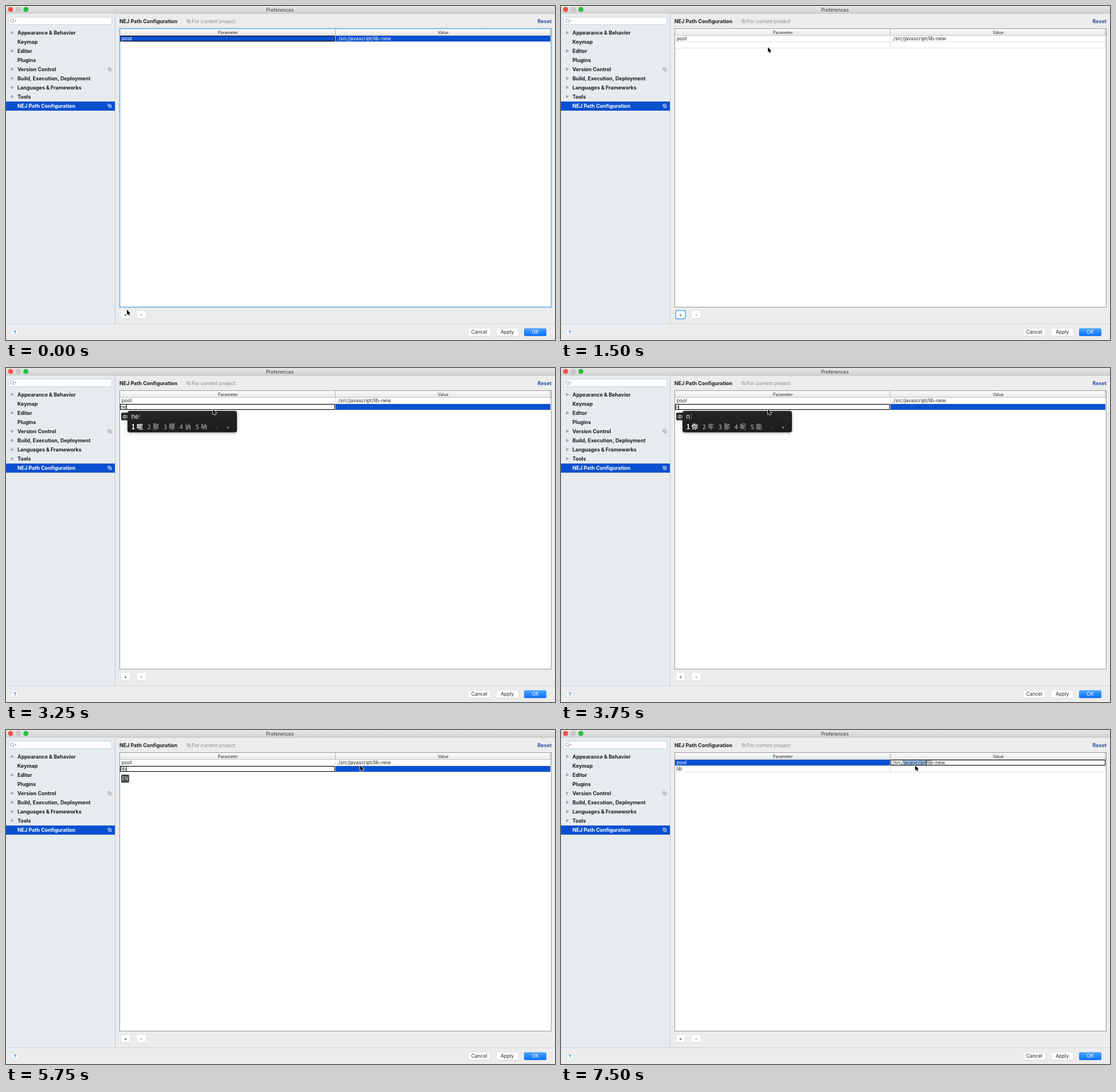
An HTML page with a canvas for the animation above (8000 ms loop, 958 px wide and 584 px high).

```html
<!DOCTYPE html>
<html lang="en">
<head>
<meta charset="utf-8">
<title>Preferences</title>
<style>
html, body { margin: 0; width: 100%; height: 100%; overflow: hidden; background: #ececec; }
canvas { display: block; }
</style>
</head>
<body>
<canvas id="stage" width="958" height="584"></canvas>
<script>
const ctx = document.getElementById('stage').getContext('2d');
const LOOP = 8000, STEP = 250;
const BLUE = '#0950d0', UI = 'Inter, sans-serif', CJK = '"Noto Sans CJK SC", "Noto Sans CJK", sans-serif';
const COLUMNS = [[199, 574], [575, 950]];
const ROW_TOP = [52, 63];
const PATH = './src/javascript/lib-new';

// Each entry changes part of the state and holds until the next one.
const timeline = [
  [0, { cursor: [211, 531], rows: [['pool', PATH]], selected: 0, cell: 0, tableFocus: true }],
  [250, { cursor: [209, 540], rows: [['pool', PATH], ['', '']], selected: -1, tableFocus: false, plusFocus: true }],
  [500, { cursor: [222, 480] }],
  [750, { cursor: [290, 300] }],
  [1000, { cursor: [345, 120] }],
  [1250, { cursor: [358, 79] }],
  [1500, { cursor: [361, 72] }],
  [1750, { selected: 1, tableFocus: true, plusFocus: false }],
  [2000, { tableFocus: false, editing: true }],
  [2500, { caret: true }],
  [3000, { rows: [['pool', PATH], ['n', '']], ime: ['n', '你', '年', '那', '呢', '能'] }],
  [3250, { rows: [['pool', PATH], ['ne', '']], ime: ['ne', '呢', '那', '哪', '讷', '呐'] }],
  [3500, { rows: [['pool', PATH], ['nej', '']], ime: ['ne j', '呢就', '哪家', '那就', '呢', '那'] }],
  [3750, { rows: [['pool', PATH], ['n', '']], ime: ['n', '你', '年', '那', '呢', '能'] }],
  [4000, { rows: [['pool', PATH], ['', '']], ime: null }],
  [4250, { badge: true }],
  [4500, { rows: [['pool', PATH], ['li', '']] }],
  [4750, { rows: [['pool', PATH], ['lib', '']] }],
  [5000, { cursor: [430, 60] }],
  [5250, { cursor: [538, 55] }],
  [5500, { cursor: [602, 56] }],
  [5750, { cursor: [618, 62] }],
  [6000, { cell: 1, editing: false, tableFocus: false, badge: false, caret: false }],
  [6250, { editing: true, caret: true }],
  [6500, { caret: false }],
  [6750, { selected: 0, editing: false }],
  [7000, { editing: true, caret: true, marked: 'javascript' }]
];

function stateAt(time) {
  return Object.assign({}, ...timeline.filter(([start]) => start <= time).map(entry => entry[1]));
}

function rect(x, y, w, h, fill) {
  ctx.fillStyle = fill;
  ctx.fillRect(x, y, w, h);
}

function frame(x, y, w, h, color, width = 1) {
  ctx.strokeStyle = color;
  ctx.lineWidth = width;
  ctx.strokeRect(x, y, w, h);
}

function rounded(x, y, w, h, r, fill, stroke, width = 1) {
  ctx.beginPath();
  ctx.roundRect(x, y, w, h, r);
  ctx.fillStyle = fill;
  ctx.fill();
  if (stroke) {
    ctx.strokeStyle = stroke;
    ctx.lineWidth = width;
    ctx.stroke();
  }
}

function disc(x, y, r, fill, stroke) {
  ctx.beginPath();
  ctx.arc(x, y, r, 0, 7);
  ctx.fillStyle = fill;
  ctx.fill();
  if (stroke) {
    ctx.strokeStyle = stroke;
    ctx.lineWidth = 0.7;
    ctx.stroke();
  }
}

function polygon(points, fill) {
  ctx.beginPath();
  points.forEach(([x, y]) => ctx.lineTo(x, y));
  ctx.closePath();
  ctx.fillStyle = fill;
  ctx.fill();
}

function text(str, x, y, { size = 8.6, weight = 400, color = '#262626', align = 'left', family = UI } = {}) {
  ctx.font = `${weight} ${size}px ${family}`;
  ctx.textAlign = align;
  ctx.fillStyle = color;
  ctx.fillText(str, x, y);
}

function gradient(top, bottom, from, to) {
  const g = ctx.createLinearGradient(0, top, 0, bottom);
  g.addColorStop(0, from);
  g.addColorStop(1, to);
  return g;
}

function copyIcon(x, y, color) {
  frame(x + 2, y + 2, 4, 4, color, 0.8);
  ctx.beginPath();
  ctx.moveTo(x + 0.2, y + 4.5);
  ctx.lineTo(x + 0.2, y + 0.2);
  ctx.lineTo(x + 4.5, y + 0.2);
  ctx.stroke();
  rect(x + 3, y + 3.6, 2, 0.6, color);
}

function drawSidebar() {
  rect(0, 13, 190, 542, '#e6ebef');
  rect(190, 13, 1, 542, '#c8cacc');
  rounded(4.5, 19.5, 180, 13, 1, '#fff', '#d0d5d9');
  disc(10.5, 25.5, 2.9, '#fff', '#6e6e6e');
  ctx.beginPath();
  ctx.moveTo(12.6, 27.7);
  ctx.lineTo(14.8, 30);
  ctx.stroke();
  polygon([[15, 25], [18.4, 25], [16.7, 26.8]], '#6e6e6e');

  const items = ['>Appearance & Behavior', 'Keymap', '>Editor', 'Plugins', '>Version Control',
    '>Build, Execution, Deployment', '>Languages & Frameworks', '>Tools', 'NEJ Path Configuration'];
  items.forEach((item, i) => {
    const y = 46.5 + 16 * i, active = i === 8;
    if (active) rect(0, 167, 190, 16, BLUE);
    if (item[0] === '>') polygon([[9, y - 3], [14, y], [9, y + 3]], '#a2a5a8');
    text(item.replace('>', ''), 20, y + 3.2, { size: 8.9, weight: 700, color: active ? '#fff' : '#1c1c1c' });
    if (active || i === 4) copyIcon(177.8, y - 3, active ? '#fff' : '#8b9aa6');
  });
}

function drawButton(label, x, y, w, h, fill = '#fff', color = '#262626') {
  rounded(x, y + 0.7, w, h, 2.5, '#cdcdcd');
  rounded(x, y, w, h, 2.5, fill, fill === '#fff' ? '#dcdcdc' : null, 0.6);
  text(label, x + w / 2, y + h / 2 + 3.1, { size: 8.5, color, align: 'center' });
}

function drawWindow(s) {
  rect(0, 0, 958, 584, '#ececec');
  rect(0, 0, 958, 13, gradient(0, 13, '#e6e6e6', '#d2d2d2'));
  rect(0, 12.5, 958, 0.8, '#b9b9b9');
  disc(8, 6, 4, '#fc4f4a', '#df4744');
  disc(21.5, 6, 4, '#c9c9c9', '#b8b8b8');
  disc(34.7, 6, 4, '#1fc53a', '#1faa30');
  text('Preferences', 478, 9.6, { size: 8.5, color: '#3d3d3d', align: 'center' });
  drawSidebar();

  text('NEJ Path Configuration', 198, 29.8, { size: 8.9, weight: 700, color: '#1c1c1c' });
  copyIcon(315.5, 23.5, '#9b9b9b');
  text('For current project', 324, 29.8, { size: 8.7, color: '#8a8a8a' });
  text('Reset', 952, 29.8, { size: 8.9, weight: 700, color: '#364f9f', align: 'right' });

  drawButton('+', 200.5, 532.5, 16, 14);
  drawButton('-', 228, 532.5, 16, 14);
  if (s.plusFocus) {
    rounded(200, 532.5, 17, 14.5, 2.5, 'transparent', '#7fb5ef', 2);
  }

  rect(0, 555, 958, 1, '#d2d2d2');
  disc(15.5, 570.5, 6.3, '#fff', '#cfcfcf');
  text('?', 15.5, 574, { size: 9.5, weight: 600, color: '#1677e6', align: 'center' });
  drawButton('Cancel', 806.5, 563.5, 38.5, 13.5);
  drawButton('Apply', 855.5, 563.5, 38.5, 13.5);
  drawButton('OK', 904, 563.5, 39, 13.5, gradient(563, 577, '#4ea7fb', '#0a70ff'), '#fff');
}

function drawEditor(s, value, left, right, top) {
  rect(left, top, right - left, 10, '#fff');
  const x = left + 1.2, base = top + 8.4;
  ctx.font = `400 8.6px ${UI}`;
  let end = x + ctx.measureText(value).width;
  if (s.marked) {
    const before = value.slice(0, value.indexOf(s.marked));
    const start = x + ctx.measureText(before).width;
    end = x + ctx.measureText(before + s.marked).width;
    rect(start, top + 1, end - start, 8.5, '#a6cdfb');
  }
  text(value, x, base);
  if (s.ime) rect(x, top + 9, end - x, 0.7, '#333');
  if (s.caret) rect(Math.round(end), top + 1, 0.9, 8.5, '#000');
  frame(left + 0.5, top + 0.5, right - left - 1, 9, '#000');
}

function drawTable(s) {
  rect(198, 39, 754, 488, '#fff');
  rect(199, 40, 752, 12, gradient(40, 52, '#fcfcfc', '#e6e6e6'));
  rect(199, 51, 752, 1, '#c6c6c6');
  rect(574, 40, 1, 12, '#b4b4b4');
  rect(949.5, 40, 1, 12, '#b4b4b4');
  text('Parameter', 387.3, 49, { size: 7.15, align: 'center' });
  text('Value', 762.8, 49, { size: 7.1, align: 'center' });

  s.rows.forEach((row, r) => {
    const top = ROW_TOP[r], selected = r === s.selected;
    rect(199, top + 10, 751, 0.8, '#d9d9d9');
    rect(574, top, 0.8, 10.5, '#d9d9d9');
    rect(949.3, top, 0.8, 10.5, '#d9d9d9');
    row.forEach((value, c) => {
      const [left, right] = COLUMNS[c], active = selected && c === s.cell;
      if (active && s.editing) return drawEditor(s, value, left, right, top);
      if (selected) rect(left, top, right - left, 10, BLUE);
      if (active) frame(left + 0.5, top + 0.5, right - left - 1, 9, '#000');
      text(value, left + 2.8, top + 8, { color: selected ? '#fff' : '#262626' });
    });
  });

  if (s.tableFocus) frame(198.5, 39.5, 753, 487, '#67aee8', 1.6);
  else frame(198.5, 39.5, 753, 487, '#989898');
}

function drawInputMethod([typed, ...choices]) {
  const wide = choices[0].length > 1, width = wide ? 244 : 191;
  rounded(201, 78, 14, 13.5, 2, '#2b2b2b');
  text('中', 207.7, 88.5, { size: 9.5, color: '#fff', align: 'center', family: CJK });
  ctx.shadowColor = 'rgba(0,0,0,.35)';
  ctx.shadowBlur = 5;
  ctx.shadowOffsetY = 1;
  rounded(212, 75, width, 37.5, 4, gradient(75, 113, '#252525', '#1c1c1c'));
  ctx.shadowColor = 'transparent';
  text(typed, 218.6, 89, { size: 11, color: '#f4f4f4' });
  rect(219 + ctx.measureText(typed).width + 1.2, 80, 0.8, 10, '#777');
  let x = 218.8;
  choices.forEach((choice, i) => {
    const style = { size: 11, weight: i ? 400 : 700, color: i ? '#bdbdbd' : '#fff', family: CJK };
    text(i + 1, x, 107.3, style);
    text(choice, x + 9.2, 107.3, style);
    x += 17 + 11 * choice.length;
  });
  const right = 212 + width;
  polygon([[right - 34, 101.5], [right - 34, 106.5], [right - 37, 104]], '#444');
  polygon([[right - 17, 101.5], [right - 17, 106.5], [right - 13.5, 104]], '#8a8a8a');
}

function drawCursor([x, y]) {
  const arrow = new Path2D('M0 0V8.8L2 7L3.4 10.2L5 9.5L3.7 6.4H6.3Z');
  ctx.save();
  ctx.translate(x, y);
  ctx.strokeStyle = '#fff';
  ctx.lineWidth = 1.3;
  ctx.stroke(arrow);
  ctx.fillStyle = '#000';
  ctx.fill(arrow);
  ctx.restore();
}

function draw(time) {
  const s = stateAt(time);
  drawWindow(s);
  drawTable(s);
  if (s.ime) drawInputMethod(s.ime);
  if (s.badge) {
    rounded(201, 78, 14, 14, 2, '#444');
    text('EN', 208, 88, { size: 8.3, color: '#e6e6e6', align: 'center' });
  }
  drawCursor(s.cursor);
}

let shown = -1;
const origin = performance.now();
function tick() {
  const time = (performance.now() - origin) % LOOP;
  const step = Math.floor(time / STEP);
  if (step !== shown) {
    shown = step;
    draw(time);
  }
  requestAnimationFrame(tick);
}
tick();
</script>
</body>
</html>
```
